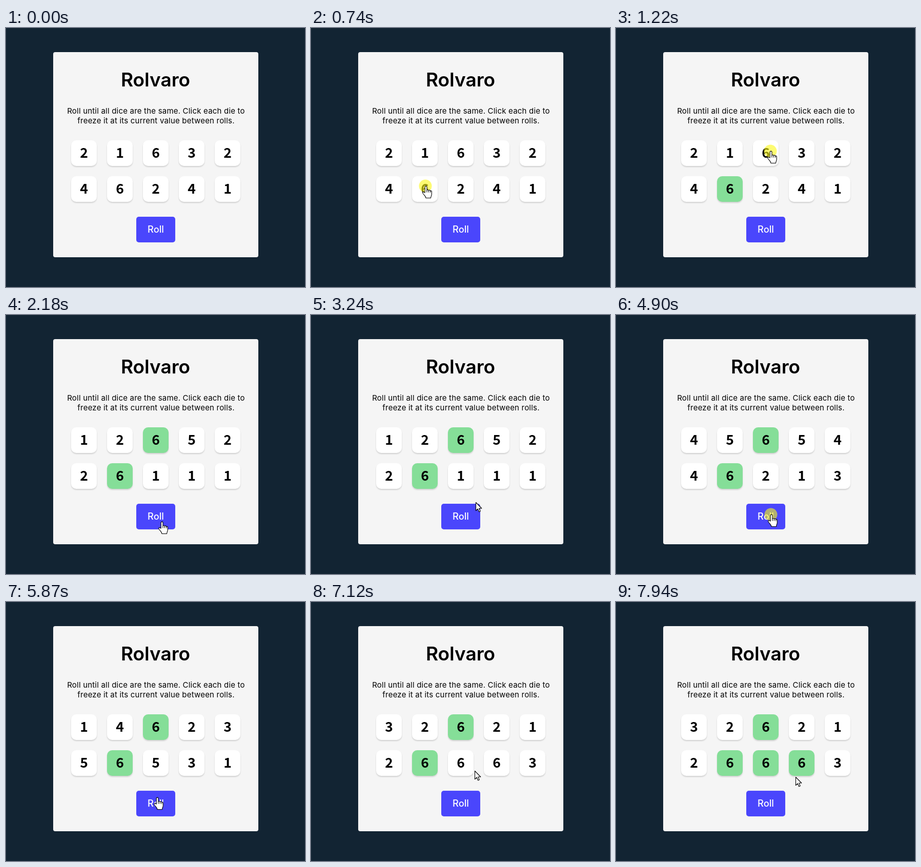
An HTML page that plays this animation: 583 by 505 pixels, repeating every 8000 ms.

```html
<!DOCTYPE html>
<html lang="en">
<head>
<meta charset="utf-8">
<title>Dice game</title>
<style>
  html, body { margin: 0; width: 100%; height: 100%; overflow: hidden; background: #122433; }
  svg { display: block; }
  text { font-family: Inter, sans-serif; text-anchor: middle; }
  .title { font-size: 37px; font-weight: 600; }
  .hint { font-size: 15px; letter-spacing: .2px; }
  .label { font-size: 18.3px; font-weight: 500; fill: #fff; }
  .die rect { fill: #fff; filter: drop-shadow(0 2px 1px rgba(0, 0, 0, .15)); }
  .die.held rect { fill: #85de98; }
  .die text { font: 700 26.5px "Noto Sans CJK JP", "Noto Sans CJK SC", Lato, sans-serif; }
  .pointer { fill: #fff; stroke: #000; stroke-width: 1.1; stroke-linejoin: round; }
</style>
</head>
<body>
<svg width="583" height="505" viewBox="0 0 583 505">
  <rect width="583" height="505" fill="#122433"/>
  <rect x="92" y="47" width="400" height="400" rx="4" fill="#f5f5f5"/>
  <text class="title" x="291.5" y="113.5">Rolvaro</text>
  <text class="hint" x="292.5" y="167">Roll until all dice are the same. Click each die to</text>
  <text class="hint" x="292.5" y="186">freeze it at its current value between rolls.</text>
  <g id="dice"></g>
  <rect x="254" y="368" width="76" height="50" rx="5" fill="#4a46fc"/>
  <text class="label" x="292" y="399">Roll</text>
  <g id="cursor">
    <circle id="glow" cx="-1" r="12.5" fill="rgba(252,248,20,.6)"/>
    <path id="arrow" class="pointer" d="M.5.5V16.5L4.2 13 6.6 18.8 9.2 17.7 6.8 12H11.8Z"/>
    <g id="hand" class="pointer">
      <path d="M-1.8 13V2a1.9 1.9 0 0 1 3.8 0V8.5a1.8 1.8 0 0 1 3.4.4 1.8 1.8 0 0 1 3.3.7 1.7 1.7 0 0 1 2.6 1.5V16c0 3-1.8 4-1.8 7.5H0C0 20.5-3 18.5-5.8 14.5c-1.4-2.2.6-3.6 2.2-2.4z"/>
      <path d="M2 8.5v4M5.4 9v3.5M8.7 9.8v3"/>
    </g>
  </g>
</svg>
<script>
  const LOOP = 8000, STEP = 70, PHASE = 60, PRESS = 140, BUTTON = 10;
  const $ = id => document.getElementById(id);

  const move = (at, x, y) => ({ at, x, y, leave: at });
  const click = (at, x, y) => ({ at, x, y, leave: at + PRESS, press: true });

  // where the cursor arrives, and when
  const stops = [
    move(200, 372, 446),
    click(600, 224, 308),
    click(1150, 302, 240),
    move(1710, 304, 403),
    click(1980, 304, 403),
    move(2960, 344, 341),
    move(3210, 321, 365),
    click(3720, 302, 385),
    click(4830, 303, 389),
    move(5560, 300, 363),
    move(5860, 295, 381),
    click(6140, 295, 381),
    move(7080, 319, 329),
    click(7260, 306, 318),
    click(7730, 362, 316),
    move(7900, 350, 341)
  ];
  // faces shown after each roll
  const rolls = ["2163246241", "1265226111", "4565446213", "1462356531", "3262126663"];

  // ten dice in two rows, then the button
  const controls = Array.from({ length: 10 }, (_, i) =>
    ({ x: 127 + i % 5 * 70, y: 219 + Math.floor(i / 5) * 70, w: 50 }));
  controls.push({ x: 254, y: 368, w: 76 });

  const hit = p => controls.findIndex(c =>
    p.x >= c.x && p.x <= c.x + c.w && p.y >= c.y && p.y <= c.y + 50);

  $("dice").innerHTML = controls.slice(0, BUTTON).map(c =>
    `<g class="die" transform="translate(${c.x} ${c.y})">
      <rect width="50" height="50" rx="10"/><text x="25" y="34"></text></g>`).join("");
  const dice = [...document.querySelectorAll(".die")];

  const ease = p => p * p * (3 - 2 * p);

  function tipAt(t) {
    const next = stops.findIndex(s => s.at > t);
    const to = stops.at(next), from = stops[Math.max(0, next - 1)];
    if (next < 1) return to;
    const p = ease(Math.max(0, (t - from.leave) / (to.at - from.leave)));
    return { x: from.x + (to.x - from.x) * p, y: from.y + (to.y - from.y) * p };
  }

  const show = (id, on) => $(id).style.display = on ? "" : "none";

  function draw(time) {
    const t = Math.max(0, Math.floor((time - PHASE) / STEP) * STEP + PHASE);
    const used = stops.filter(s => s.press && s.leave <= t).map(hit);
    const faces = rolls[used.filter(c => c === BUTTON).length];
    dice.forEach((die, i) => {
      die.lastChild.textContent = faces[i];
      die.classList.toggle("held", used.includes(i));
    });

    const tip = tipAt(t), hand = hit(tip) >= 0;
    $("cursor").setAttribute("transform", `translate(${Math.round(tip.x)} ${Math.round(tip.y)})`);
    show("cursor", t >= stops[0].at);
    show("hand", hand);
    show("arrow", !hand);
    show("glow", stops.some(s => s.press && t >= s.at && t < s.leave));
  }

  const start = performance.now();
  function tick() {
    draw((performance.now() - start) % LOOP);
    requestAnimationFrame(tick);
  }
  tick();
</script>
</body>
</html>
```
